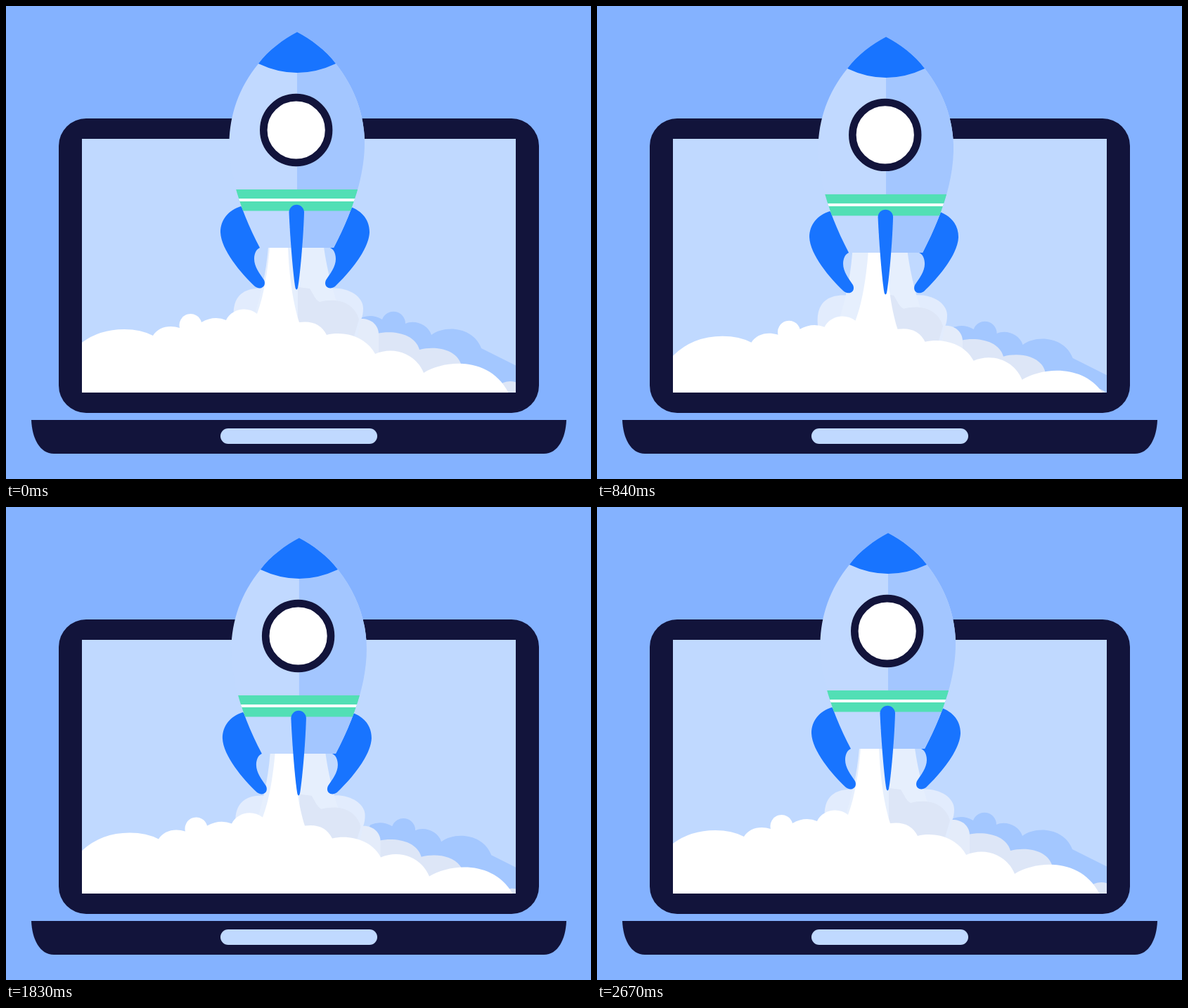
An HTML page for the animation above (2700 ms loop, 832 px wide and 673 px high).

```html
<!DOCTYPE html>
<html lang="en">
<head>
<meta charset="utf-8">
<title>Rocket launch</title>
<style>
  html, body { margin: 0; width: 100%; height: 100%; overflow: hidden; background: #84b2ff; }
  svg { display: block; width: 832px; height: 673px; }
</style>
</head>
<body>
<svg viewBox="0 0 832 673">
  <defs>
    <clipPath id="screenClip"><rect x="108" y="189" width="617" height="361"/></clipPath>
    <path id="hull" d="M414 37C395 47 373 63 359 82C331 116 318 155 317.5 195C317.5 245 336 296 361 344H466C491 296 510 245 510 195C510 155 496 116 469 82C455 63 433 47 414 37Z"/>
    <clipPath id="hullClip"><use href="#hull"/></clipPath>
    <path id="fin" fill="#1874ff" d="M334 285C316 291 305 304 305 322C306 347 334 380 354 399C362 405 371 399 367 390C361 381 353 371 353 360C353 352 356 346 361 344L372 320Z"/>
  </defs>

  <!-- laptop -->
  <rect x="75" y="160" width="683" height="419" rx="39" fill="#12143b"/>
  <rect x="108" y="189" width="617" height="361" fill="#c0d9ff"/>
  <path fill="#12143b" d="M36 589H797C796 615 785 637 765 637H68C48 637 37 615 36 589Z"/>
  <rect x="305" y="601" width="223" height="22" rx="11" fill="#c0d9ff"/>

  <!-- smoke -->
  <g clip-path="url(#screenClip)">
    <path id="far" fill="#a3c7ff" d="M490 470L504 444Q520 437 535 446A17 17 0 0 1 568 452C580 446 600 452 605 468C625 453 665 457 676 487L760 529V600H490Z"/>
    <g id="middle">
      <path fill="#dde6f7" d="M500 470L528 466C550 461 582 466 588 489C610 483 640 488 647 509L652 600H500Z"/>
      <ellipse cx="717" cy="556" rx="24" ry="22" fill="#dde6f7"/>
      <path fill="#e4ecfa" d="M440 445H506C520 445 530 455 530 467V560H440Z"/>
      <path fill="#e2ecfd" d="M330 470C318 435 320 399 366 402H460C484 399 508 412 508 430Q508 440 505 446L500 470Z"/>
      <path fill="#e6effd" d="M375 310L373 343C370 380 362 415 350 450H480C468 415 458 385 452 343L449 310Z"/>
      <path fill="#dde6f7" d="M415 400L432 402C438 412 440 418 446 421C474 414 496 424 502 446L495 470H415Z"/>
    </g>
    <path id="near" fill="#fff" d="M90 496Q120 460 168 460Q192 460 209 469C216 457 232 453 247 458A16 16 0 0 1 278 450Q296 440 313 447C320 432 342 426 357 438C366 415 372 380 375 343L377 310H399L401 343C403 390 409 425 417 450Q445 446 456 468C480 462 512 470 525 495C550 484 582 493 594 522C625 503 690 498 716 553V600H90Z"/>
  </g>

  <!-- rocket -->
  <g id="rocket">
    <use href="#fin"/>
    <use href="#fin" transform="translate(822 0) scale(-1 1)"/>
    <use href="#hull" fill="#c1d9ff"/>
    <g clip-path="url(#hullClip)">
      <rect x="414" y="30" width="100" height="320" fill="#a3c6ff"/>
      <path fill="#1874ff" d="M350 30H480V82H469Q414 108 359 82H350Z"/>
      <rect x="310" y="261" width="210" height="30.5" fill="#52dfb5"/>
      <rect x="310" y="274" width="210" height="4" fill="#fff"/>
    </g>
    <circle cx="412.7" cy="176.5" r="46.4" fill="#fff" stroke="#12143b" stroke-width="10.6"/>
    <path fill="#1874ff" d="M402.5 293.5A10.7 10.7 0 0 1 424 293.5C423 330 418 385 415 401Q413.2 406 411.5 401C408.5 385 404 330 402.5 293.5Z"/>
  </g>
</svg>
<script>
const LOOP = 2700, STEP = 30;
const times = [0, 630, 1080, 1410, 1830, 2340, 2670];

// Offsets of each moving part at the times above
const tracks = {
  rocket: { x: [0, -3.4, -1.6, 0.4, 2.9, 1.9, 0], y: [0, 5.5, 8.2, 9.4, 7, 2.9, 0] },
  near:   { x: [0, 9, 11.5, 12, 8, 3, 0],         y: [0, 12.3, 4.5, 1.2, 3.6, 2.3, 0] },
  middle: { x: [0, -12.3, -4.8, 0, 2.6, 2, 0],    y: [0, 12, 4.7, 1.8, 8.8, 5.5, 0] },
  far:    { x: [0, 0, 1.5, 2, 14.2, 10, 0],       y: [0, 17.4, 6.7, 1.6, 8.3, 5, 0] }
};

// Smooth curve through the values, with slopes taken from the neighbours
function sample(values, t) {
  const last = times.length - 1;
  if (t >= times[last]) return values[last];
  const i = times.findIndex((start, k) => t < times[k + 1]);
  const slope = k => {
    const a = Math.max(k - 1, 0), b = Math.min(k + 1, last);
    return (values[b] - values[a]) / (times[b] - times[a]);
  };
  const span = times[i + 1] - times[i];
  const u = (t - times[i]) / span, v = 1 - u;
  return v * v * (1 + 2 * u) * values[i] + u * u * (1 + 2 * v) * values[i + 1]
    + span * u * v * (v * slope(i) - u * slope(i + 1));
}

const start = performance.now();

function draw(now) {
  const elapsed = Math.max(0, now - start) % LOOP;
  const t = Math.floor(elapsed / STEP) * STEP;
  for (const [id, { x, y }] of Object.entries(tracks)) {
    document.getElementById(id).setAttribute("transform", `translate(${sample(x, t)} ${sample(y, t)})`);
  }
  requestAnimationFrame(draw);
}
draw(start);
</script>
</body>
</html>
```
